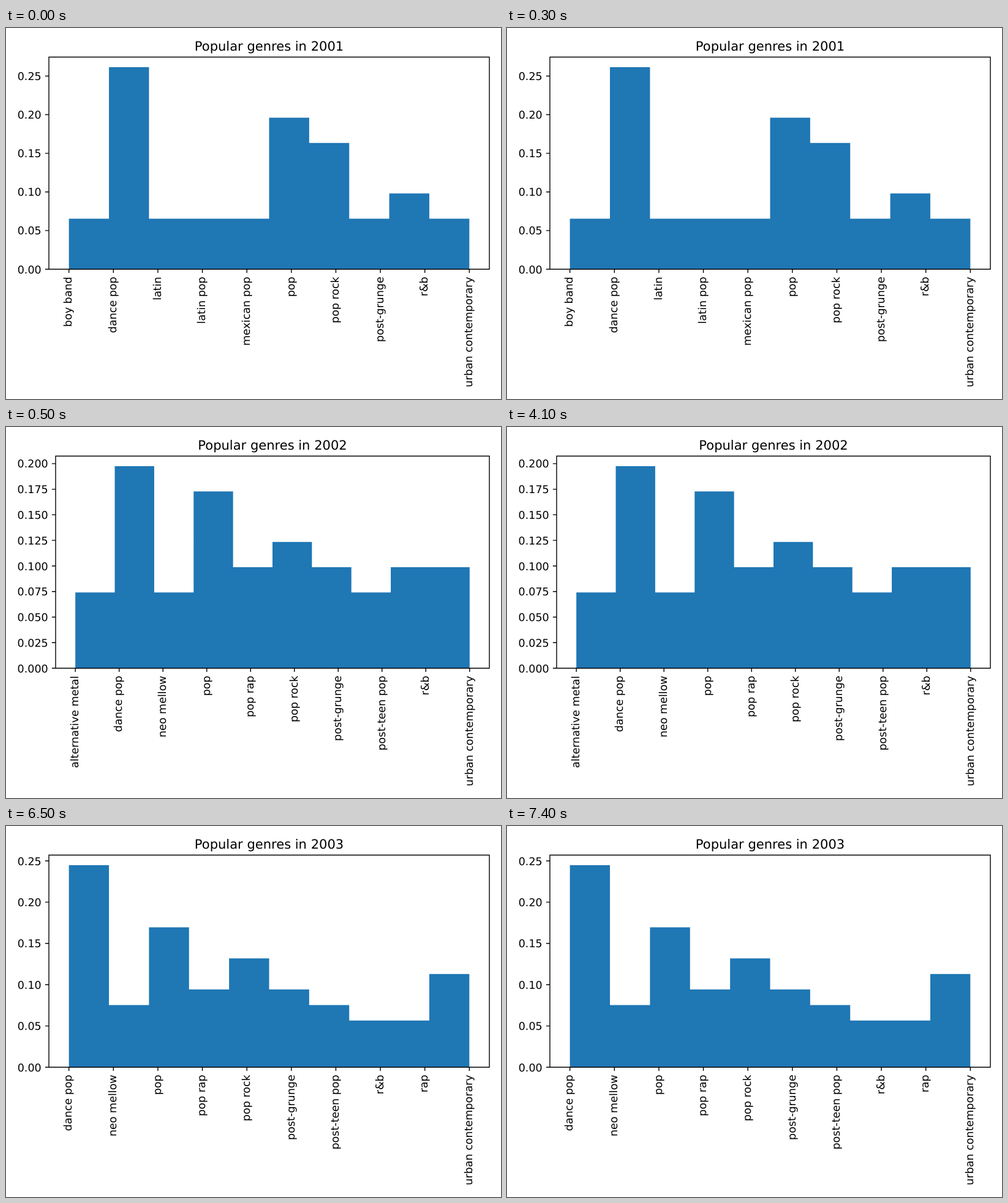
These frames come from a looping animation (808 by 606 pixels, 8000 ms). An HTML page:

```html
<!DOCTYPE html>
<html lang="en">
<head>
<meta charset="utf-8">
<title>Popular genres by year</title>
<style>
  html, body { margin: 0; width: 100%; height: 100%; overflow: hidden; background: #fff; }
  svg { display: block; width: 100vw; height: 100vh; }
  text { font-family: "DejaVu Sans", sans-serif; font-size: 17.53px; text-rendering: geometricPrecision; }
  .title { font-size: 21.04px; text-anchor: middle; }
  .label { text-anchor: end; }
  .bars { fill: #1f77b4; }
  .lines { fill: none; stroke: #000; stroke-width: 1.4; }
  .chart { visibility: hidden; animation: 8s step-end infinite; }
  .chart:nth-child(1) { animation-name: first; }
  .chart:nth-child(2) { animation-name: second; }
  .chart:nth-child(3) { animation-name: third; }
  @keyframes first { 0% { visibility: visible } 6.25%, 100% { visibility: hidden } }
  @keyframes second { 0% { visibility: hidden } 6.25% { visibility: visible } 81.25%, 100% { visibility: hidden } }
  @keyframes third { 0% { visibility: hidden } 81.25%, 100% { visibility: visible } }
</style>
</head>
<body>
<svg id="stage" viewBox="0 0 808 606"></svg>
<script>
const RIGHT = 789, TOP = 47.5, BOTTOM = 394, TICK = 6.1, PAD = 12.3;

const charts = [
  { year: 2001, left: 70, step: 0.05, digits: 2,
    counts: [2, 8, 2, 2, 2, 6, 5, 2, 3, 2],
    genres: ["boy band", "dance pop", "latin", "latin pop", "mexican pop", "pop",
      "pop rock", "post-grunge", "r&b", "urban contemporary"] },
  { year: 2002, left: 81, step: 0.025, digits: 3,
    counts: [3, 8, 3, 7, 4, 5, 4, 3, 4, 4],
    genres: ["alternative metal", "dance pop", "neo mellow", "pop", "pop rap", "pop rock",
      "post-grunge", "post-teen pop", "r&b", "urban contemporary"] },
  { year: 2003, left: 70, step: 0.05, digits: 2,
    counts: [13, 4, 9, 5, 7, 5, 4, 3, 3, 6],
    genres: ["dance pop", "neo mellow", "pop", "pop rap", "pop rock", "post-grunge",
      "post-teen pop", "r&b", "rap", "urban contemporary"] }
];

function add(parent, tag, attrs, content = "") {
  const node = document.createElementNS("http://www.w3.org/2000/svg", tag);
  for (const key in attrs) node.setAttribute(key, attrs[key]);
  node.textContent = content;
  return parent.appendChild(node);
}

function drawChart({ year, left, step, digits, counts, genres }) {
  const group = add(document.getElementById("stage"), "g", { class: "chart" });
  const span = (RIGHT - left) / 1.1;
  const start = left + span * 0.05;
  const total = counts.reduce((sum, n) => sum + n, 0);
  // Density of a histogram whose bins are 0.9 wide.
  const densities = counts.map(n => n / (total * 0.9));
  const limit = Math.max(...densities) * 1.05;
  const yOf = value => BOTTOM - (BOTTOM - TOP) * value / limit;

  const outline = densities.map((d, i) => `V${yOf(d)}H${start + span * (i + 1) / 10}`).join("");
  add(group, "path", { class: "bars", d: `M${start} ${BOTTOM}${outline}V${BOTTOM}Z` });

  let lines = `M${left} ${TOP}H${RIGHT}V${BOTTOM}H${left}Z`;
  for (let i = 0; i * step < limit; i++) {
    const y = yOf(i * step);
    lines += `M${left} ${y}h${-TICK}`;
    add(group, "text", { class: "label", x: left - PAD, y: y + 6.6 }, (i * step).toFixed(digits));
  }
  genres.forEach((genre, i) => {
    const x = start + span * i / 9;
    lines += `M${x} ${BOTTOM}v${TICK}`;
    add(group, "text", { class: "label", transform: `translate(${x + 4.8} ${BOTTOM + PAD}) rotate(-90)` }, genre);
  });
  add(group, "path", { class: "lines", d: lines });
  add(group, "text", { class: "title", x: (left + RIGHT) / 2, y: 37 }, `Popular genres in ${year}`);
}

charts.forEach(drawChart);
</script>
</body>
</html>
```
